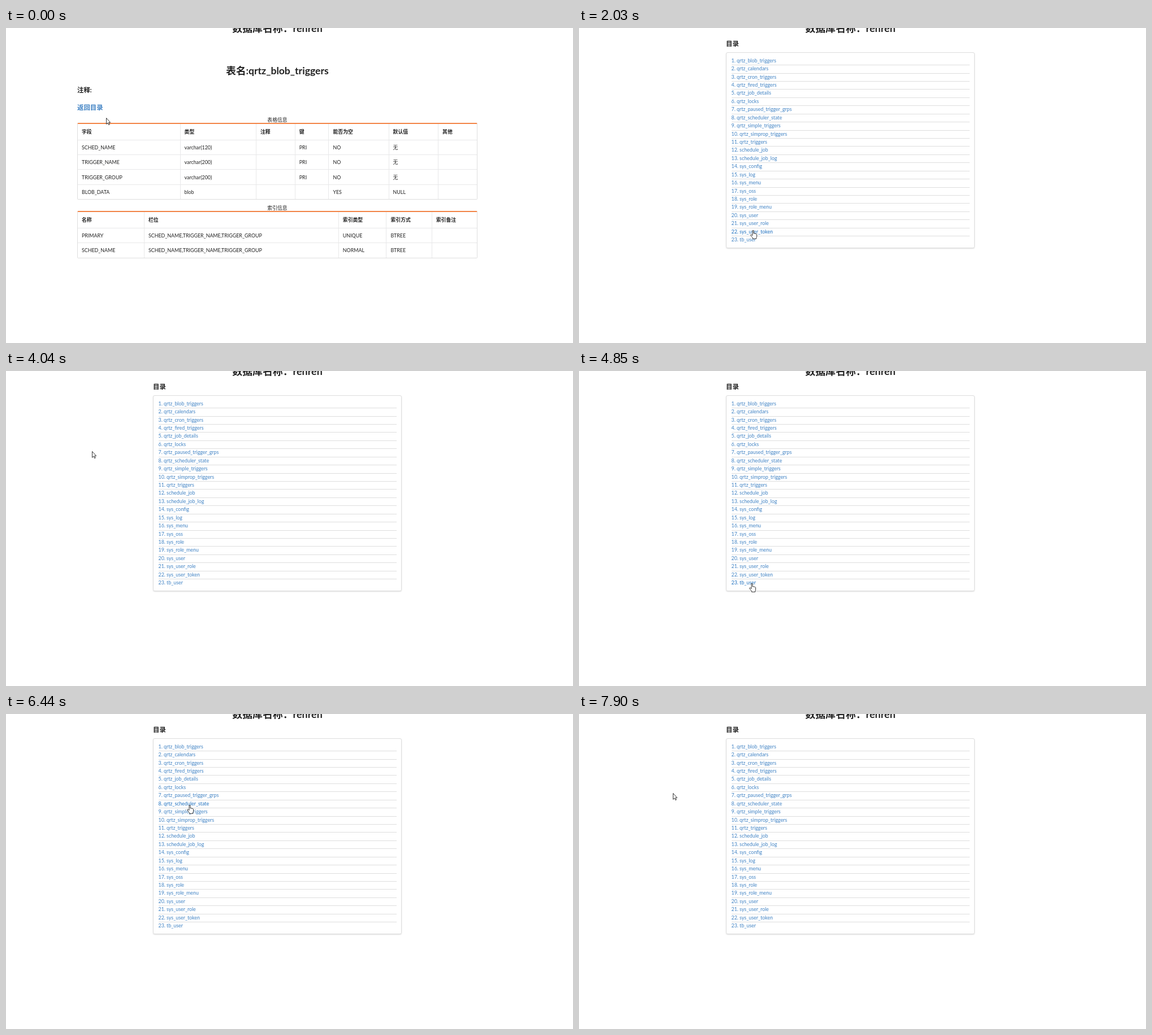
These frames come from a looping animation (1003 by 558 pixels, 8000 ms). An HTML page:

```html
<!DOCTYPE html>
<html lang="zh-CN">
<head>
<meta charset="utf-8">
<title>数据库文档</title>
<style>
  * { box-sizing: border-box; }
  html, body { margin: 0; width: 100%; height: 100%; overflow: hidden; background: #fff; }
  body { position: relative; font: 8.85px Lato, "Noto Sans CJK SC", "Noto Sans CJK", sans-serif; color: rgba(0, 0, 0, .87); white-space: nowrap; }
  h1, h2, h3 { margin: 0; font-weight: 700; }
  h1, h2 { line-height: 20px; text-align: center; }
  h1 { position: absolute; left: 126px; top: -10px; width: 708px; font-size: 17.9px; font-family: Lato, "Noto Sans CJK TC", sans-serif; }
  h2 { margin-bottom: 17px; font-size: 17.6px; }
  h3 { margin-bottom: 17px; font-size: 11.4px; line-height: 14px; }
  h3.back { margin-bottom: 9px; }
  a { color: #4183c4; }
  a.hover { color: #1e70bf; }

  .page { position: absolute; left: 126px; top: 66px; width: 708px; visibility: hidden; }
  #list { left: 260px; top: 21px; width: 440px; }
  .page.on, .cursor.on { visibility: visible; }

  table { width: 100%; margin-bottom: 9px; border: 1px solid rgba(34, 36, 38, .15); border-top: 2px solid #f28446; border-radius: 2px; border-spacing: 0; }
  caption { line-height: 11px; }
  th, td { padding: 0 7px; text-align: left; border-left: 1px solid rgba(34, 36, 38, .1); }
  th { height: 27.6px; }
  td { height: 26.4px; border-top: 1px solid rgba(34, 36, 38, .1); }
  th:first-child, td:first-child { border-left: 0; }

  ol { margin: -9px 0 0; height: 347px; padding: 6.8px 8.5px; list-style: none; border: 1px solid rgba(34, 36, 38, .15); border-radius: 3px; box-shadow: 0 1px 2px rgba(34, 36, 38, .15); }
  li { height: 14.43px; line-height: 12.4px; border-top: 1px solid rgba(34, 36, 38, .15); }
  li:first-child { border-color: transparent; }

  .cursor { position: absolute; left: 0; top: 0; overflow: visible; visibility: hidden; pointer-events: none; stroke: #222; stroke-width: .9; fill: #fff; stroke-linejoin: round; }
</style>
</head>
<body>
<h1>数据库名称：renren</h1>
<script>
const LOOP = 8000, STEP = 128;
const FIELD_HEAD = '字段|类型|注释|键|能否为空|默认值|其他';
const INDEX_HEAD = '名称|栏位|索引类型|索引方式|索引备注';

const tables = {
  blob: {
    name: 'qrtz_blob_triggers', note: '',
    fields: ['SCHED_NAME|varchar(120)||PRI|NO|无|', 'TRIGGER_NAME|varchar(200)||PRI|NO|无|',
      'TRIGGER_GROUP|varchar(200)||PRI|NO|无|', 'BLOB_DATA|blob|||YES|NULL|'],
    indexes: ['PRIMARY|SCHED_NAME,TRIGGER_NAME,TRIGGER_GROUP|UNIQUE|BTREE|',
      'SCHED_NAME|SCHED_NAME,TRIGGER_NAME,TRIGGER_GROUP|NORMAL|BTREE|']
  },
  token: {
    name: 'sys_user_token', note: '系统用户Token',
    fields: ['user_id|bigint(20)||PRI|NO|无|', 'token|varchar(100)|token|UNI|NO|无|',
      'expire_time|datetime|过期时间||YES|NULL|', 'update_time|datetime|更新时间||YES|NULL|'],
    indexes: ['PRIMARY|user_id|UNIQUE|BTREE|', 'token|token|UNIQUE|BTREE|']
  },
  user: {
    name: 'tb_user', note: '用户',
    fields: ['user_id|bigint(20)||PRI|NO|无|auto_increment', 'username|varchar(50)|用户名|UNI|NO|无|',
      'mobile|varchar(20)|手机号||NO|无|', 'password|varchar(64)|密码||YES|NULL|',
      'create_time|datetime|创建时间||YES|NULL|'],
    indexes: ['PRIMARY|user_id|UNIQUE|BTREE|', 'username|username|UNIQUE|BTREE|']
  },
  state: {
    name: 'qrtz_scheduler_state', note: '',
    fields: ['SCHED_NAME|varchar(120)||PRI|NO|无|', 'INSTANCE_NAME|varchar(200)||PRI|NO|无|',
      'LAST_CHECKIN_TIME|bigint(13)|||NO|无|', 'CHECKIN_INTERVAL|bigint(13)|||NO|无|'],
    indexes: ['PRIMARY|SCHED_NAME,INSTANCE_NAME|UNIQUE|BTREE|']
  }
};

const items = ('qrtz_blob_triggers qrtz_calendars qrtz_cron_triggers qrtz_fired_triggers qrtz_job_details ' +
  'qrtz_locks qrtz_paused_trigger_grps qrtz_scheduler_state qrtz_simple_triggers qrtz_simprop_triggers ' +
  'qrtz_triggers schedule_job schedule_job_log sys_config sys_log sys_menu sys_oss sys_role ' +
  'sys_role_menu sys_user sys_user_role sys_user_token tb_user').split(' ');

// Each page opens at a time; the pointer then follows a path between two times.
const visits = [
  { page: 'blob', at: 0, from: 125, to: 370, path: [[177, 159], [159, 139]] },
  { page: 'list', at: 1040, from: 1190, to: 2030, path: [[160, 144], [260, 290], [308, 358]] },
  { page: 'token', at: 2470, from: 2500, to: 3130, path: [[288, 330], [162, 169], [152, 141]] },
  { page: 'list', at: 4040, from: 4060, to: 4850, path: [[152, 142], [314, 327], [305, 303], [328, 346], [306, 376]] },
  { page: 'user', at: 5130, from: 5130, to: 5950, path: [[239, 124], [177, 101], [160, 142]] },
  { page: 'list', at: 6200, from: 6200, to: 6710, path: [[160, 143], [349, 163], [305, 162]] },
  { page: 'state', at: 7020, from: 7020, to: 7650, path: [[305, 163], [166, 140]] },
  { page: 'list', at: 7900, from: 7900, to: LOOP, path: [[166, 140], [166, 140]] }
];

const cursors = {
  arrow: 'M.5.5V11.3L3 9 4.7 12.6 6.3 11.9 4.7 8.3H7.6Z',
  hand: 'M-1 9.5V1q1-1.5 2 0V6q1-.9 2 .2q1-.7 1.9.5q1.1-.3 1.6.8V11q0 1.5-1 3V15.4H-.5V14Q-2.5 12-4.5 8.8q.6-1.8 2-.4Z',
  beam: 'M-1-.5H1M2-.5H4M1.5 0V9M-1 9.5H4'
};

const row = (cells, tag) => `<tr>${cells.split('|').map(c => `<${tag}>${c}</${tag}>`).join('')}</tr>`;

const grid = (caption, head, rows) =>
  `<table><caption>${caption}</caption>${row(head, 'th')}${rows.map(r => row(r, 'td')).join('')}</table>`;

const tablePage = ([id, { name, note, fields, indexes }]) => `<section class="page" id="${id}">
  <h2>表名:${name}</h2><h3>注释:${note}</h3><h3 class="back"><a>返回目录</a></h3>
  ${grid('表格信息', FIELD_HEAD, fields)}${grid('索引信息', INDEX_HEAD, indexes)}</section>`;

const listPage = `<section class="page" id="list"><h3>目录</h3>
  <ol>${items.map((name, i) => `<li><a>${i + 1}. ${name}</a></li>`).join('')}</ol></section>`;

const cursor = ([id, d]) => `<svg class="cursor" id="${id}" width="1" height="1"><path d="${d}"/></svg>`;

document.body.insertAdjacentHTML('beforeend',
  Object.entries(tables).map(tablePage).join('') + listPage + Object.entries(cursors).map(cursor).join(''));

const layers = document.querySelectorAll('.page, .cursor');
const links = document.querySelectorAll('a');

function show(...ids) {
  for (const el of layers) el.classList.toggle('on', ids.includes(el.id));
}

// Pointer position: eased along the path, moving in even time steps
function pointer({ from, to, path }, t) {
  const steps = Math.round((to - from) / STEP);
  const p = Math.floor(Math.min(1, Math.max(0, (t - from) / (to - from))) * steps) / steps;
  const along = (1 - (1 - p) ** 2) * (path.length - 1);
  const i = Math.min(Math.floor(along), path.length - 2);
  return path[i].map((v, axis) => Math.round(v + (path[i + 1][axis] - v) * (along - i)));
}

let last;
function draw() {
  const t = performance.now() % LOOP;
  const visit = visits.findLast(v => v.at <= t);
  const [x, y] = pointer(visit, t);
  const pose = [visit.page, x, y].join();
  if (pose !== last) {
    last = pose;
    show(visit.page);
    const target = document.elementFromPoint(x, y)?.closest('a');
    const kind = !target ? 'arrow' : visit.page === 'list' ? 'hand' : 'beam';
    show(visit.page, kind);
    for (const link of links) link.classList.toggle('hover', link === target);
    document.getElementById(kind).style.transform = `translate(${x}px, ${y}px)`;
  }
  requestAnimationFrame(draw);
}
draw();
</script>
</body>
</html>
```
